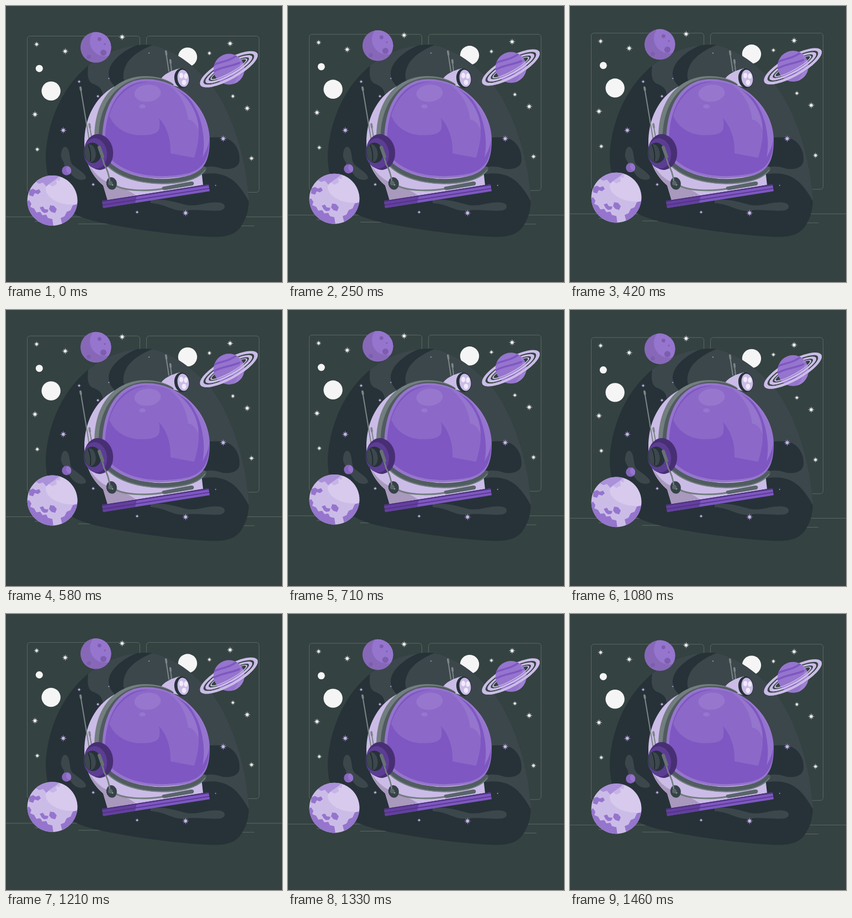
Write an HTML page that moves like this. It is 500 px wide and 500 px high and loops after 1500 ms.

```html
<!DOCTYPE html>
<html lang="en">
<head>
<meta charset="utf-8">
<title>Space helmet</title>
<style>
html, body { margin: 0; width: 100%; height: 100%; overflow: hidden; background: #344241; }
svg { display: block; width: 100vw; height: 100vh; }
</style>
</head>
<body>
<svg viewBox="0 0 500 500">
  <defs>
    <path id="blobShape" d="M255 70C290 70 338 104 370 140C410 190 436 280 440 348C440 368 436 382 430 392C420 412 405 420 365 418C300 415 220 402 182 394.500C150 388 125 381 108 366C82 340 72 305 72 272C74 215 98 155 140 116C170 88 210 70 255 70Z"/>
    <path id="visorShape" d="M174.500 252C172 193 195 133 254 132.500C315 132 369 186 369 243C369 284 356 300 330 307C283 317 226 314 191 286C181 277 175.500 266 174.500 252Z"/>
    <clipPath id="blobClip"><use href="#blobShape"/></clipPath>
    <clipPath id="visorClip"><use href="#visorShape"/></clipPath>
    <clipPath id="earthClip"><circle cx="84" cy="352.500" r="45.400"/></clipPath>
    <clipPath id="moonClip"><circle cx="162.700" cy="75" r="27.800"/></clipPath>
    <clipPath id="ringedClip"><circle cx="404" cy="114.500" r="28"/></clipPath>
    <clipPath id="frontHalf"><rect x="-65" y="0" width="130" height="30"/></clipPath>
    <path id="rings" fill="#cbbce7" fill-rule="evenodd"/>
  </defs>

  <rect width="500" height="500" fill="#344241"/>

  <g class="float">
    <g fill="none" stroke="#66726f" stroke-width=".8">
      <rect x="38.500" y="54.500" width="204" height="283" rx="5"/>
      <rect x="254.500" y="54.500" width="204" height="283" rx="5"/>
      <path d="M0 382H500M52 390.300H84M131 394.800H200M400 398.300H450"/>
    </g>
    <g fill="#f5f5f5">
      <circle cx="329" cy="92.500" r="17.200"/>
      <circle cx="81.600" cy="154" r="17.200"/>
      <circle cx="60.300" cy="113.200" r="6.500"/>
    </g>
    <path id="whiteStars" fill="#f5f5f5"/>
  </g>

  <use href="#blobShape" fill="#263238"/>
  <g clip-path="url(#blobClip)">
    <g fill="#3c474c">
      <path d="M150 100C146 126 148 137 158 141C171 146 177 153 175 170L202 150C187 138 183 125 188 112C194 96 215 78 243 69L200 60Z"/>
      <path d="M268 70C243 79 225 93 218 106C213 116 212 124 213 132L330 310L353 305C382 300 401 306 416 320C426 330 434 342 441 356L470 350V60H268Z"/>
      <path d="M101 262C104 252 111 253 114 264C117 277 115 285 125 291C135 299 146 306 145 312C140 318 125 315 118 304C112 295 104 291 105 283C99 276 99 269 101 262Z"/>
      <path d="M262 352C290 348 310 357 330 361C350 363 365 354 385 356C399 357 399 367 390 370C372 373 345 367 325 371C301 372 290 359 262 357Z"/>
    </g>
    <path fill="#263238" d="M350 240C375 237 392 237 402 241C417 248 424 264 423 280C422 292 409 297 393 295C378 290 366 289 350 294Z"/>
  </g>
  <path id="purpleStars" fill="#cdb9f2"/>

  <g class="float">
    <!-- cratered moon -->
    <g clip-path="url(#moonClip)">
      <rect x="130" y="40" width="66" height="66" fill="#8768b8"/>
      <circle cx="179" cy="64" r="27" fill="#9575cd"/>
      <g fill="#7d5eae">
        <circle cx="169.300" cy="60" r="3.400"/>
        <circle cx="176.500" cy="84.500" r="5.600"/>
        <circle cx="150" cy="92.300" r="3.800"/>
        <circle cx="179" cy="69" r="1.500"/>
      </g>
    </g>
    <!-- patched planet -->
    <g clip-path="url(#earthClip)">
      <rect x="38" y="306" width="92" height="93" fill="#cbbce7"/>
      <path fill="#ab91da" d="M66 306H99L97 317L91 315L92 323L84 327L78 323L73 327L67 320L60 322L53 318Z"/>
      <g fill="#9575cd">
        <path d="M36 354L42 352L46 358L44 364L51 367L55 374L62 373L66 379L73 378L76 384L84 386L86 400H50L36 375Z"/>
        <path d="M42 334L49 331L54 334L60 332L63 337L58 341L52 339L49 345L42 343Z"/>
        <path d="M80 361L87 362L92 368L89 375L82 373L78 368Z"/>
        <path d="M61 365L67 363L70 368L77 369L75 374L69 375L65 372Z"/>
        <path d="M131 358L121 361L117 370L110 373L106 381L99 384L103 400H131Z"/>
      </g>
      <path fill="#e4daf4" opacity=".5" d="M99 304C93 317 70 322 72 333C75 350 101 363 131 359V304Z"/>
    </g>
    <circle cx="109.700" cy="298.300" r="8.500" fill="#8765bc"/>
    <path fill="#9575cd" d="M112 290.200A8.500 8.500 0 0 1 116 304C109 303 106 295 112 290.200Z"/>
    <!-- ringed planet -->
    <use href="#rings" transform="translate(403.700 114.500) rotate(-29)"/>
    <g clip-path="url(#ringedClip)">
      <rect x="375" y="86" width="58" height="58" fill="#9575cd"/>
      <g fill="none" stroke="#7e57c2" stroke-width="3.500">
        <path d="M374 108C390 99 401 103 420 88M374 120C392 108 408 112 434 98M382 136C402 126 410 132 434 117"/>
      </g>
      <path fill="#ae93dc" opacity=".4" d="M416 86C429 100 427 127 409 144H436V86Z"/>
    </g>
    <g transform="translate(403.700 114.500) rotate(-29)"><use href="#rings" clip-path="url(#frontHalf)"/></g>
  </g>

  <g id="helmet">
    <!-- lamp -->
    <g fill="none" stroke="#7c8588" stroke-linecap="round">
      <path stroke-width="2" d="M289.500 82L295 118M297.500 98L300 118"/>
      <path stroke-width="3.600" d="M289.700 82L290.600 88M297.700 98L298.300 103"/>
    </g>
    <path fill="#cbbce7" d="M278 136C285 123 299 117 315 113L314 147L303 144Z"/>
    <ellipse cx="318.700" cy="131" rx="13.700" ry="18" fill="#263238" transform="rotate(-8 318.700 131)"/>
    <ellipse cx="321" cy="131" rx="10.300" ry="15.600" fill="#cbbce7" transform="rotate(-8 321 131)"/>
    <g fill="#f0eafa">
      <ellipse cx="317.500" cy="126" rx="3.700" ry="5"/>
      <ellipse cx="325.800" cy="127" rx="3.400" ry="5"/>
      <ellipse cx="322.500" cy="138.500" rx="4" ry="4.800"/>
    </g>

    <!-- shell -->
    <path fill="#cbbce7" d="M196 146C160 166 142 205 142 248C142 285 158 310 176 325L184 352L357 324L354 298L260 200Z"/>
    <path fill="#a999bd" d="M150 286C160 304 172 314 186 320C204 329 220 331 235 343L184 352L176 325C164 315 155 302 150 286Z"/>
    <path fill="none" stroke="#737e7e" stroke-width="3" d="M195 323C210 335 255 337 290 330"/>
    <path fill="#59656a" d="M284 327.500L335 318C341 317 342 322.500 338 325L288 333.500C283 334 281 329 284 327.500Z"/>

    <!-- collar -->
    <path fill="#737e7e" d="M302 140C286 130 268 126.500 250 127C196 129 160 170 160 238C160 264 170 280 186 293L220 250Z"/>
    <path fill="#4f5b5e" d="M304 142C288 132 270 129.500 253 130C203 132 168 176 168 238C168 264 176 280 191 292L220 250Z"/>
    <path fill="none" stroke="#505d60" stroke-width="9" stroke-linecap="round" d="M187 287C217 316 278 324 326 313C343 309 353 302 358.500 295"/>
    <path fill="none" stroke="#737e7e" stroke-width="1.800" d="M184 290C215 320 278 328 327 317C343 313 355 305 361 297"/>

    <!-- visor -->
    <use href="#visorShape" fill="#9575cd"/>
    <g clip-path="url(#visorClip)">
      <path fill="#7e57c2" d="M180 250C177 198 199 137 255 136.500C315 136.500 368 188 368 243C368 281 354 297 328 303.500C283 312.500 229 310 195 282C185 274 181 264 180 250Z"/>
      <path fill="#8c68c8" d="M187 199C197 222 220 235 247 234C264 234 278 231 278 219C279 212 278 207 277 203C292 219 299 243 298 267L341 275C345 261 350 242 349 227C345 213 338 207 330 206C334 180 318 150 288 141C240 126 199 155 187 199Z"/>
      <path fill="#9575cd" d="M288 138C315 157 327 179 330 206C338 207 345 213 349 227C350 197 333 160 288 138Z"/>
      <path fill="#9d7ed3" opacity=".75" d="M295 136C333 155 355 195 358 240C359 254 358 264 356 274C364 260 368 250 368 238C364 190 336 148 295 136Z"/>
      <ellipse cx="256.500" cy="158" rx="24" ry="15.500" fill="#9776ce" transform="rotate(-5 256.500 158)"/>
      <ellipse cx="247" cy="182" rx="6" ry="3.700" fill="#9776ce"/>
    </g>

    <!-- base -->
    <path fill="#7e57c2" d="M174 353L367 323L369 335.500L176 366Z"/>
    <path fill="#643f9f" d="M174 353L237 343.200L234 356.700L176 366Z"/>
    <g fill="none" stroke="#4e3180">
      <path stroke-width="2" d="M174.200 354L367.200 324"/>
      <path stroke-width="1.300" d="M175 360.500L368.200 330.300"/>
    </g>

    <!-- ear cup -->
    <g fill="none" stroke="#7c8588" stroke-linecap="round">
      <path stroke-width="2" d="M135 148L151 244M151 215L155.500 240"/>
      <path stroke-width="3.800" d="M134.800 147.500L135.800 152M151 214L152 220"/>
    </g>
    <ellipse cx="168" cy="264.500" rx="26" ry="32.500" fill="#482f74" transform="rotate(-8 168 264.500)"/>
    <ellipse cx="162" cy="267" rx="21" ry="27.500" fill="#5c3d94" transform="rotate(-8 162 267)"/>
    <ellipse cx="157" cy="266" rx="15.500" ry="18.500" fill="#263238" transform="rotate(-8 157 266)"/>
    <ellipse cx="152.500" cy="266.500" rx="10" ry="16" fill="#3c484d" transform="rotate(-8 152.500 266.500)"/>
    <path fill="none" stroke="#1f292e" stroke-width="1.800" d="M149 252Q155 265 153 281"/>

    <!-- microphone -->
    <ellipse cx="191.300" cy="321.500" rx="9.500" ry="11.300" fill="#354247" transform="rotate(-10 191.300 321.500)"/>
    <path fill="none" stroke="#737e80" stroke-width="2.600" stroke-linecap="round" stroke-linejoin="round" d="M169 256L178 287Q186 300 188 318"/>
    <path fill="none" stroke="#667175" stroke-width="6" stroke-linecap="round" d="M169 256L175 273"/>
    <circle cx="189" cy="321" r="4" fill="#59656a"/>
    <circle cx="193" cy="324" r="1.500" fill="#8a9396"/>
  </g>
</svg>
<script>
const LOOP = 1500, RISE = 9.7, LOW = 1470, START = 0.39;
const floaters = document.querySelectorAll('.float');

const setPath = (id, parts) => document.getElementById(id).setAttribute('d', parts.join(''));

// Eight thin rays, the diagonal ones slightly shorter
function star([x, y, r]) {
  let d = '';
  for (let i = 0; i < 16; i++) {
    const len = i % 2 ? r * 0.32 : i % 4 ? r * 0.88 : r;
    const a = i * Math.PI / 8;
    d += (i ? 'L' : 'M') + (x + len * Math.sin(a)).toFixed(2) + ' ' + (y - len * Math.cos(a)).toFixed(2);
  }
  return d + 'Z';
}

const ellipse = ([rx, ry]) => `M${-rx} 0A${rx} ${ry} 0 0 1 ${rx} 0A${rx} ${ry} 0 0 1 ${-rx} 0Z`;

// Outer and inner edge of each band in turn
setPath('rings', [[59, 18.5], [52, 14], [48, 12.2], [41.5, 9], [38, 7.6], [35.5, 6.2]].map(ellipse));

setPath('whiteStars', [
  [55.5, 69.3, 5.4], [107.3, 82, 6.2], [210.4, 56.2, 6.2], [52.5, 196.3, 6.2], [56.7, 259.7, 5],
  [406, 68, 6.2], [368.5, 85.5, 4.7], [411, 163.5, 4.7], [437, 185.3, 6.2], [444.8, 276, 5.4]
].map(star));
setPath('purpleStars', [
  [103.8, 225.2, 6.4], [393.5, 240.3, 6.4], [325.3, 375, 6.4], [132.5, 137, 3.7], [166.5, 163.5, 3.5],
  [158, 323.3, 3.7], [237.5, 373.5, 3.7], [186.3, 131.2, 1.8], [259, 85.3, 1.6], [379.8, 325, 1.6]
].map(star));

function render(t) {
  const phase = ((t - LOW + LOOP) % LOOP) / LOOP;
  const lift = RISE * (1 - Math.abs(2 * phase - 1)) - START;
  for (const g of floaters) g.setAttribute('transform', `translate(0 ${-lift.toFixed(3)})`);
}

let begin;
function tick(now) {
  begin ??= now;
  render((now - begin) % LOOP);
  requestAnimationFrame(tick);
}
render(0);
requestAnimationFrame(tick);
</script>
</body>
</html>
```
